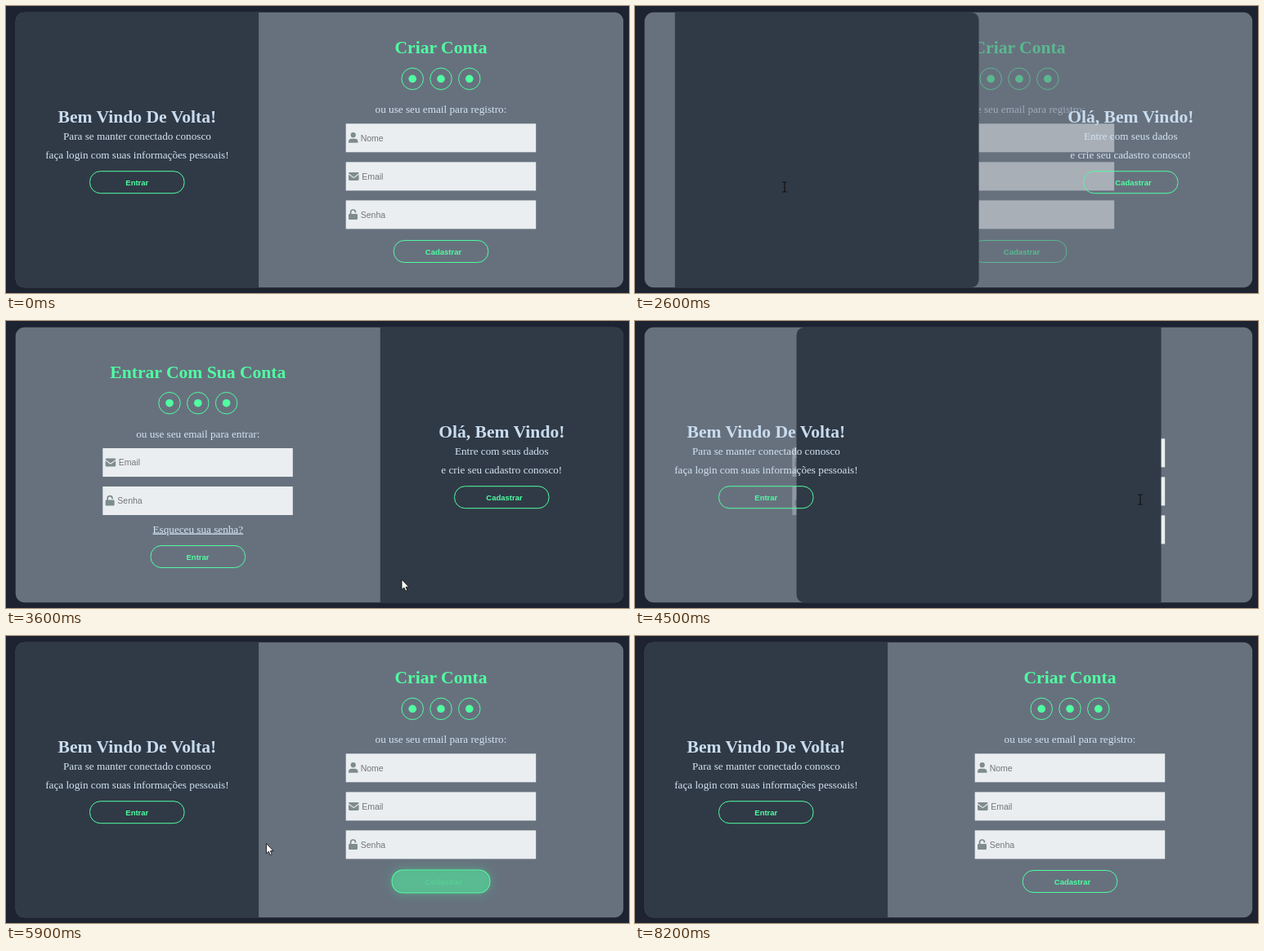
Write an HTML page that moves like this. It is 762 px wide and 352 px high and loops after 8900 ms.

```html
<!DOCTYPE html>
<html lang="pt">
<head>
<meta charset="utf-8">
<title>Login</title>
<style>
html, body { margin: 0; width: 100%; height: 100%; overflow: hidden; background: #1d2330; }
svg { display: block; width: 762px; height: 352px; }
text { text-anchor: middle; font: 13.2px "Liberation Serif", "Times New Roman", serif; fill: #d3e3f2; }
.title { font-size: 21.6px; font-weight: bold; fill: #c9dcee; }
.green { fill: #50fda2; }
.hint { text-anchor: start; font: 10.5px "Liberation Sans", Arial, sans-serif; fill: #757575; }
.btn text { font: bold 9.5px "Liberation Sans", Arial, sans-serif; }
.box { stroke: #50fda2; stroke-width: 1; }
.field { fill: #eaeef0; }
.icon { fill: #7f8c8d; }
.line { fill: none; stroke: #7f8c8d; stroke-width: 1.7; }
</style>
</head>
<body>
<svg viewBox="0 0 762 352">
  <defs>
    <clipPath id="card"><rect x="11.7" y="7.8" width="743.4" height="337.4" rx="11"/></clipPath>
    <filter id="glow" x="-100%" y="-150%" width="300%" height="400%">
      <feGaussianBlur stdDeviation="8" result="far"/>
      <feGaussianBlur in="SourceGraphic" stdDeviation="2.5" result="near"/>
      <feMerge><feMergeNode in="far"/><feMergeNode in="near"/></feMerge>
    </filter>
    <g id="nome">
      <circle class="icon" cx="9" cy="-3.6" r="3.1"/>
      <path class="icon" d="M3.3 6V4.500Q3.300 1 7 1H11Q14.700 1 14.700 4.500V6Z"/>
    </g>
    <g id="email">
      <path class="icon" d="M3.300-3.600Q3.300-4.900 4.600-4.900H14.600Q15.900-4.900 15.900-3.600L10.300.600Q9.600 1.100 8.900.600Z"/>
      <path class="icon" d="M3.300-2.200L8.600 1.700Q9.600 2.400 10.600 1.700L15.900-2.200V3.700Q15.900 5 14.600 5H4.600Q3.300 5 3.300 3.700Z"/>
    </g>
    <g id="senha">
      <rect class="icon" x="3.300" y="-1" width="11" height="7" rx="1.2"/>
      <path class="line" d="M5.900-.500V-3a2.900 2.900 0 0 1 5.800 0V-2.300"/>
    </g>
  </defs>
  <rect width="762" height="352" fill="#1d2330"/>
  <g clip-path="url(#card)">
    <rect width="762" height="352" fill="#67717e"/>
    <g id="login"></g>
    <g id="signup"></g>
    <path id="panel" fill="#303a46"/>
  </g>
  <g id="back"></g>
  <g id="hello"></g>
  <g id="cursor" stroke-linejoin="round">
    <path id="arrow" fill="#fff" stroke="#111" stroke-width=".9" d="M0 0V12.500L2.900 9.900L4.800 14.200L6.800 13.300L5 9.200H8.700Z"/>
    <path id="hand" fill="#fff" stroke="#111" stroke-width="1.100" d="M-1.500 1Q0-1 1.500 1V6.500Q3.100 5.700 4 7.200Q5.600 6.500 6.300 8Q7.900 7.700 8 9.500V13Q8 15.500 6.500 18H0Q-2 15-4.700 11.500Q-5.200 9.300-3 9.800L-1.500 11.300Z"/>
    <path id="beam" fill="none" stroke="#111" stroke-width="1.200" d="M-2.800-6H-1Q0-6 0-5V5Q0 6-1 6H-2.800M2.800-6H1Q0-6 0-5M0 5Q0 6 1 6H2.800"/>
  </g>
</svg>
<script>
const LOOP = 8900, STEP = 100, FADE = 300;
const CARD = { x: 11.7, y: 7.8, w: 743.4, h: 337.4, r: 11 };
const $ = id => document.getElementById(id);

const label = (x, y, s, cls = '', more = '') => `<text x="${x}" y="${y}" class="${cls}" ${more}>${s}</text>`;

const field = (x, y, name) => `<g transform="translate(${x} ${y + 17.5})">
  <rect class="field" y="-17.500" width="232.500" height="35"/>
  <use href="#${name.toLowerCase()}"/>
  ${label(name === 'Email' ? 19.500 : 18, 3.700, name, 'hint')}</g>`;

// A rounded box that fills, grows and glows on hover
const hoverable = (id, x, y, w, h, r, inner) => {
  const shape = `x="${-w / 2}" y="${-h / 2}" width="${w}" height="${h}" rx="${r}"`;
  return `<g id="${id}" class="btn" data-x="${x}" data-y="${y}">
    <rect class="halo" ${shape} fill="#50fda2" filter="url(#glow)"/>
    <rect class="box" ${shape}/><g class="ink">${inner}</g></g>`;
};
const button = (id, x, y, s, dx) => hoverable(id, x, y, 115.5, 27, 13, label(dx, 3.5, s, '', 'style="fill:inherit"'));
const socials = (id, x, y) => [-34.8, 0, 34.8].map((dx, i) =>
  hoverable(id + i, x + dx, y, 26.5, 26.5, 13.25, '<circle r="4.800"/>')).join('');

$('signup').innerHTML = label(532, 58, 'Criar Conta', 'title green') + socials('up', 532, 89.3)
  + label(532, 131, 'ou use seu email para registro:')
  + field(415.7, 144.3, 'Nome') + field(415.7, 191.4, 'Email') + field(415.7, 238.4, 'Senha')
  + button('register', 532, 301, 'Cadastrar', 3);
$('login').innerHTML = label(234.8, 70, 'Entrar Com Sua Conta', 'title green') + socials('in', 234.8, 100.7)
  + label(234.8, 142.5, 'ou use seu email para entrar:')
  + field(118.3, 156, 'Email') + field(118.3, 203, 'Senha')
  + label(234.8, 259.5, 'Esqueceu sua senha?', '', 'text-decoration="underline"')
  + button('enter', 234.8, 289, 'Entrar', -.3);
$('back').innerHTML = label(160.4, 143, 'Bem Vindo De Volta!', 'title')
  + label(160.4, 164, 'Para se manter conectado conosco')
  + label(160.4, 187, 'faça login com suas informações pessoais!')
  + button('goLogin', 160.3, 216.2, 'Entrar', 0);
$('hello').innerHTML = label(606.3, 143, 'Olá, Bem Vindo!', 'title')
  + label(606.3, 164, 'Entre com seus dados')
  + label(606.3, 187, 'e crie seu cadastro conosco!')
  + button('goSignup', 606.3, 216.2, 'Cadastrar', 3.2);

// [target, pointer in, pointer out]
const hovers = [
  ['up1', 400, 700], ['goLogin', 1400, 2600], ['goSignup', 3900, 4400],
  ['register', 5300, 5700], ['goLogin', 6100, 6400],
  ['up0', 6600, 7000], ['up1', 7000, 7400], ['up2', 7400, 7900]
];
// [time, x, y]
const path = [
  [400, 532, 97], [600, 527, 99], [800, 495, 158], [1000, 400, 240], [1200, 196, 253],
  [1400, 190, 228], [1700, 183, 222], [2900, 183, 222], [3400, 476, 315], [3600, 484, 317],
  [3900, 612, 226], [4200, 618, 219], [4700, 618, 219], [5100, 577, 287], [5300, 552, 298],
  [5600, 538, 300], [6100, 172, 224], [6300, 174, 221], [6600, 495, 98], [6900, 495, 98],
  [7100, 531, 98], [7300, 534, 98], [7500, 566, 98], [8000, 568, 99]
];
// [progress, panel left, panel width], as parts of the card
const slide = [[0, 0, .4], [.25, .05, .5], [.5, .25, .6], [.75, .45, .5], [1, .6, .4]];
// [progress, shift, opacity] of the form that leaves
const leave = [[0, 0, 1], [.25, 62, .5], [.5, 74, .3], [.75, 77, .2], [1, 85, 0]];

const clamp = v => Math.max(0, Math.min(1, v));
const mix = (a, b, k) => a + (b - a) * k;
function track(keys, t) {
  let i = 1;
  while (i < keys.length - 1 && keys[i][0] < t) i++;
  const [a, b] = [keys[i - 1], keys[i]], k = clamp((t - a[0]) / (b[0] - a[0]));
  return [mix(a[1], b[1], k), mix(a[2], b[2], k)];
}
const blend = (a, b, k) => `rgb(${a.map((v, i) => Math.round(mix(v, b[i], k)))})`;
const GREEN = [80, 253, 162], GREY = [103, 113, 126];
const show = (id, on) => $(id).setAttribute('visibility', on ? 'visible' : 'hidden');

function hoverLevel(id, t) {
  return Math.max(0, ...hovers.filter(h => h[0] === id).map(([, a, b]) =>
    t < b ? clamp((t - a) / FADE) : clamp((b - a) / FADE) * clamp(1 - (t - b) / FADE)));
}

function drawPanel(left, width, onRight) {
  const x = CARD.x + left * CARD.w, w = width * CARD.w, { y, h, r } = CARD;
  const far = onRight ? x + w : x, near = onRight ? x : x + w, d = onRight ? -r : r;
  $('panel').setAttribute('d',
    `M${near} ${y}H${far + d}Q${far} ${y} ${far} ${y + r}V${y + h - r}Q${far} ${y + h} ${far + d} ${y + h}H${near}Z`);
}

function drawForm(id, p, dir, current) {
  const [dx, alpha] = track(leave, p);
  $(id).setAttribute('transform', `translate(${current ? 0 : dx * dir} 0)`);
  $(id).setAttribute('opacity', current ? 1 : alpha);
}

function drawCursor(t, login) {
  const [x, y] = track(path, t);
  const left = login ? 118 : 416, tops = login ? [156, 203] : [144, 191, 238];
  const inField = x > left && x < left + 232 && tops.some(v => y > v && y < v + 35);
  const overButton = hovers.some(([, a, b]) => t >= a && t < b);
  const kind = overButton ? 'hand' : inField ? 'beam' : 'arrow';
  const visible = t >= 400 && t < 8000;
  for (const k of ['arrow', 'hand', 'beam']) show(k, visible && k === kind);
  $('cursor').setAttribute('transform', `translate(${x} ${y})`);
}

const buttons = [...document.querySelectorAll('.btn')];
function draw(t) {
  const login = t > 2500 && t < 4400;
  const gone = clamp((t - 2500) / 400), home = clamp((t - 4300) / 400);
  const [left, width] = track(slide, t < 4300 ? gone : 1 - home);
  drawPanel(left, width, login);
  drawForm('signup', gone, -1, !login);
  drawForm('login', t < 4400 ? 0 : home, 1, login);
  show('back', !login);
  show('hello', login);
  for (const b of buttons) {
    const h = hoverLevel(b.id, t);
    b.setAttribute('transform', `translate(${b.dataset.x} ${b.dataset.y}) scale(${1 + .11 * h})`);
    b.querySelector('.halo').setAttribute('opacity', h * .85);
    b.querySelector('.box').setAttribute('fill', `rgba(80,253,162,${h})`);
    b.querySelector('.ink').setAttribute('fill', blend(GREEN, GREY, h));
  }
  // The login form stays under the card until it is first needed
  show('login', t > 2500 && t < 4700);
  drawCursor(t, login);
}

const start = performance.now();
function tick() {
  const t = (performance.now() - start) % LOOP;
  draw(Math.floor(t / STEP) * STEP);
  requestAnimationFrame(tick);
}
tick();
</script>
</body>
</html>
```
